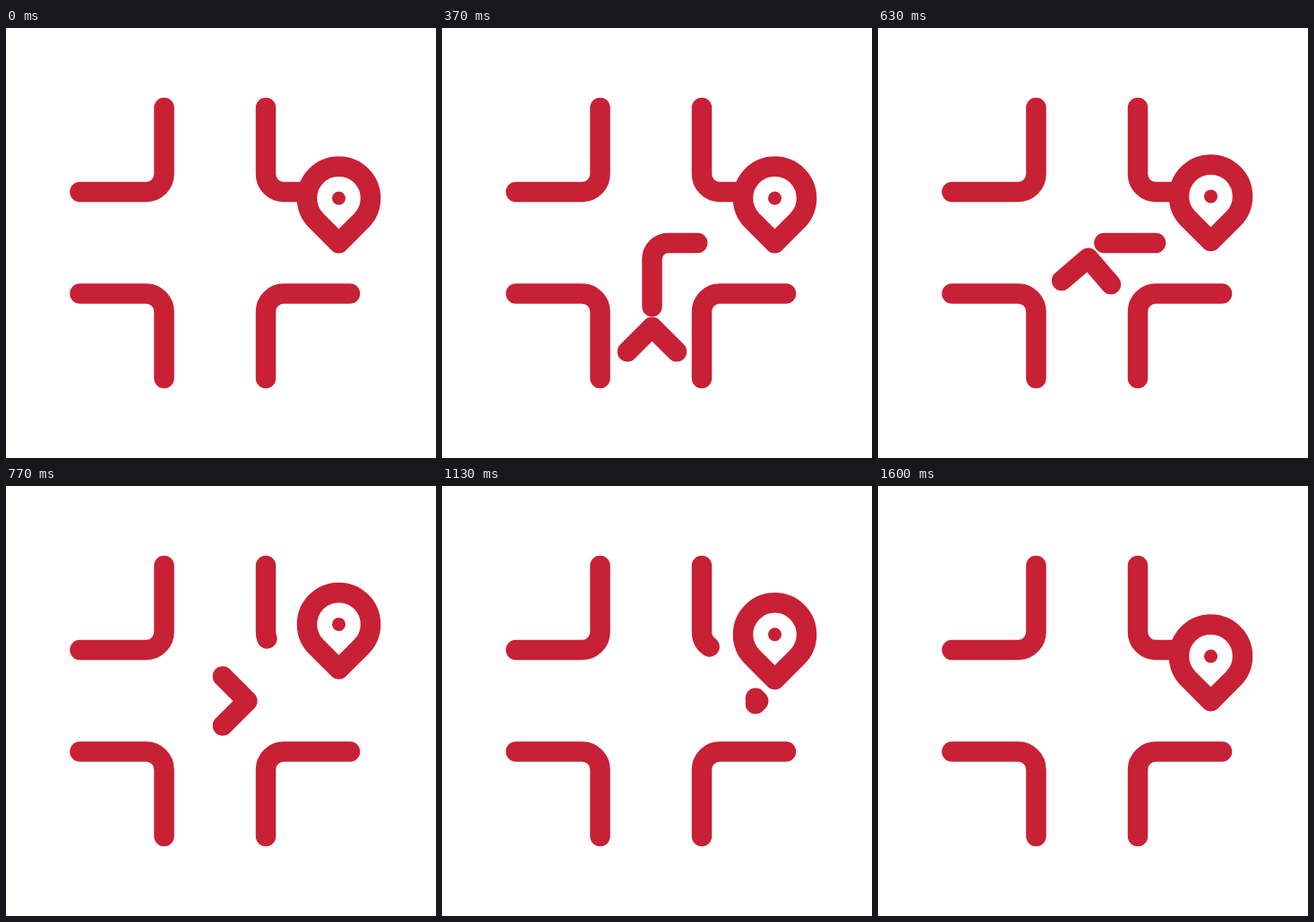
Animation, 480 px wide and 480 px high, one loop 1.63 s. Source, as an HTML page:

```html
<!DOCTYPE html>
<html lang="en">
<head>
<meta charset="utf-8">
<title>Crossroads route</title>
<style>
  html, body { margin: 0; width: 100%; height: 100%; overflow: hidden; background: #fff; }
  svg { display: block; width: 100vw; height: 100vh; }
  .ink { fill: none; stroke: #c82035; stroke-width: 22.5; stroke-linecap: round; stroke-linejoin: round; }
</style>
</head>
<body>
<svg viewBox="0 0 480 480">
  <g class="ink">
    <path d="M176.5 89V163a20 20 0 0 1-20 20H82.5"/>
    <path d="M82.5 296.5H156.5a20 20 0 0 1 20 20V391"/>
    <path d="M384 296.5H310a20 20 0 0 0-20 20V391"/>
    <path id="road" d="M290 89V163a20 20 0 0 0 20 20H340"/>
    <path id="trail" d="M234.5 391V258a18 18 0 0 1 18-18H310"/>
    <path id="arrow"/>
    <g id="pin">
      <path fill="#fff" d="M0 50.2L-25.1 25.1A35.5 35.5 0 1 1 25.1 25.1Z"/>
      <circle r="7.5" fill="#c82035" stroke="none"/>
    </g>
  </g>
</svg>
<script>
const LOOP = 1630, TRAIL = 219;
const [road, trail, arrow, pin] = ['road', 'trail', 'arrow', 'pin'].map(id => document.getElementById(id));

const progress = (t, from, to) => Math.min(1, Math.max(0, (t - from) / (to - from)));
const smooth = u => u * u * (3 - 2 * u);
const sine = u => (1 - Math.cos(Math.PI * u)) / 2;
const easeOut = (u, power) => 1 - Math.pow(1 - u, power);

// Point and heading on the route: up, round the corner, right.
function along(d) {
  const up = 133, r = 18, bend = r * Math.PI / 2;
  if (d <= up) return [234.5, 391 - d, 0];
  if (d >= up + bend) return [252.5 + d - up - bend, 240, 90];
  const a = (d - up) / r;
  return [252.5 - r * Math.cos(a), 258 - r * Math.sin(a), a * 180 / Math.PI];
}

function drawTrail(t) {
  const head = TRAIL * easeOut(progress(t, 0, 560), 2);
  const tail = TRAIL * Math.pow(progress(t, 0, 796), 1.315);
  const len = head - tail;
  trail.style.display = len > 11 ? '' : 'none';
  trail.setAttribute('stroke-dasharray', `${Math.max(len, 1)} 999`);
  trail.setAttribute('stroke-dashoffset', -tail);
}

function drawArrow(t) {
  const arm = 27.5 * Math.min(progress(t, 0, 250), progress(t, 1150, 980));
  const [x, y, turn] = along(275 * sine(progress(t, -40, 1320)));
  arrow.style.display = arm > 0 ? '' : 'none';
  arrow.setAttribute('d', `M${-arm} ${arm}L0 0L${arm} ${arm}`);
  arrow.setAttribute('transform', `translate(${x} ${y}) rotate(${turn})`);
}

// The pin hops up while the road behind it draws back, then both settle.
function drawPin(t) {
  const back = 1 - easeOut(progress(t, 970, 1600), 1.8);
  const lift = 41 * smooth(progress(t, 600, 820)) * back;
  const cut = 62.5 * smooth(progress(t, 600, 845)) * back;
  pin.setAttribute('transform', `translate(371.5 ${190 - lift})`);
  road.setAttribute('stroke-dasharray', `${130 - cut} 999`);
}

function tick() {
  const now = performance.now() % LOOP;
  const step = Math.min(48, Math.floor((now + 4) * 0.03)); // 30 poses per second
  const t = Math.round(step * 10 / 3) * 10;
  drawTrail(t);
  drawArrow(t);
  drawPin(t);
  requestAnimationFrame(tick);
}
tick();
</script>
</body>
</html>
```
